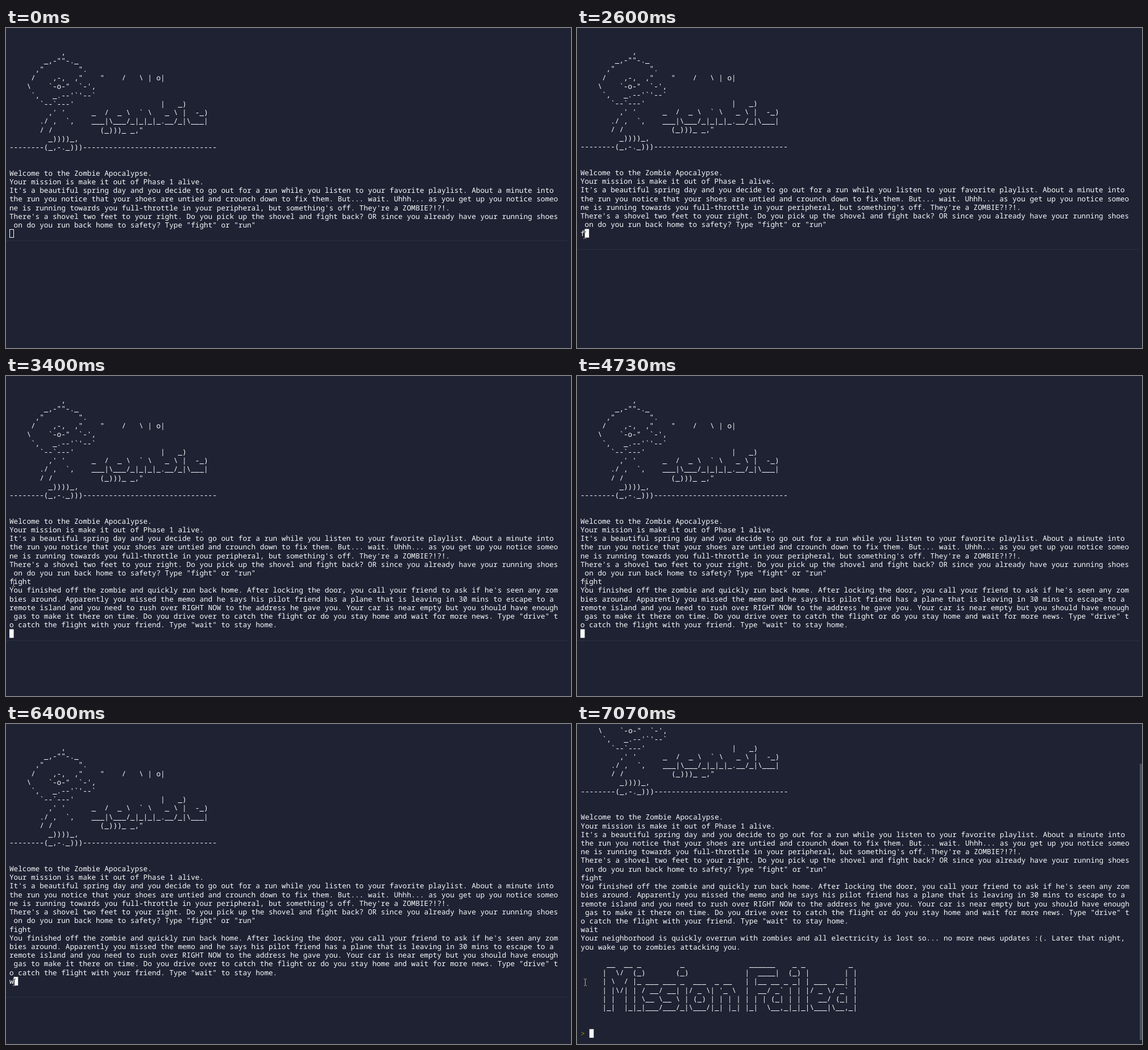
An HTML page with a canvas that plays this animation: 994 px wide and 563 px high, repeating every 8 s.

```html
<!DOCTYPE html>
<html lang="en">
<head>
<meta charset="utf-8">
<title>Zombie terminal</title>
<style>
  html, body { margin: 0; width: 100%; height: 100%; overflow: hidden; background: #1e2233; }
  canvas { display: block; }
</style>
</head>
<body>
<canvas id="stage" width="994" height="563"></canvas>
<script type="text/plain" id="story">


            ,
        _,-""-._
      ,"        ".
     /    ,-,  ,"    "    /   \ | o|
    \    `-o-"  `-',
     `,   _.--'`'--`
       `--`---'                    |   _)
         ,' '      _  /  _ \  ` \   _ \ |  -_)
       ./ ,  `,    ___|\___/_|_|_|_.__/_|\___|
       / /           (_)))_ _,"
         _))))_,
--------(_,-._)))-------------------------------


Welcome to the Zombie Apocalypse.
Your mission is make it out of Phase 1 alive.
It's a beautiful spring day and you decide to go out for a run while you listen to your favorite playlist. About a minute into
the run you notice that your shoes are untied and crounch down to fix them. But... wait. Uhhh... as you get up you notice someo
ne is running towards you full-throttle in your peripheral, but something's off. They're a ZOMBIE?!?!.
There's a shovel two feet to your right. Do you pick up the shovel and fight back? OR since you already have your running shoes
 on do you run back home to safety? Type "fight" or "run"
fight
You finished off the zombie and quickly run back home. After locking the door, you call your friend to ask if he's seen any zom
bies around. Apparently you missed the memo and he says his pilot friend has a plane that is leaving in 30 mins to escape to a
remote island and you need to rush over RIGHT NOW to the address he gave you. Your car is near empty but you should have enough
 gas to make it there on time. Do you drive over to catch the flight or do you stay home and wait for more news. Type "drive" t
o catch the flight with your friend. Type "wait" to stay home.
wait
Your neighborhood is quickly overrun with zombies and all electricity is lost so... no more news updates :(. Later that night,
you wake up to zombies attacking you.

      __  __ _         _               ______    _ _          _
     |  \/  (_)       (_)             |  ____|  (_) |        | |
     | \  / |_ ___ ___ _  ___  _ __   | |__ __ _ _| | ___  __| |
     | |\/| | / __/ __| |/ _ \| '_ \  |  __/ _` | | |/ _ \/ _` |
     | |  | | \__ \__ \ | (_) | | | | | | | (_| | | |  __/ (_| |
     |_|  |_|_|___/___/_|\___/|_| |_| |_|  \__,_|_|_|\___|\__,_|


</script>
<script>
const ctx = document.getElementById('stage').getContext('2d');
const lines = document.getElementById('story').textContent.slice(1).split('\n');

const LOOP = 8000, TICK = 1000 / 15;
const CELL = 7.6, ROW = 15.22, LEFT = 6, TOP = 4.1, BASE = 12;
const BG = '#1e2233', INK = '#fbfcfd', RULE = '#2b3042', THUMB = '#4b5062', PROMPT = '#a39300';
const FIGHT_ROW = 23, WAIT_ROW = 29, PROMPT_ROW = 41;

// [time, letters typed so far]
const fightKeys = [[2600, 1], [2670, 2], [2800, 4], [2930, 5]];
const waitKeys = [[6400, 1], [6530, 2], [6670, 3], [6800, 4]];

const typed = (keys, t) => keys.reduce((n, [at, count]) => t >= at ? count : n, 0);
const mix = (a, b, p) => a + (b - a) * p;
const ease = p => p * p * (3 - 2 * p);

// Progress of a move in whole ticks; the first tick already shows movement.
function progress(t, start, steps) {
  const n = Math.floor((t - start + 4) / TICK) + 1;
  return Math.max(0, Math.min(1, n / steps));
}

function drawText(str, x, y, color = INK) {
  ctx.fillStyle = color;
  for (let i = 0; i < str.length; i++) {
    if (str[i] !== ' ') ctx.fillText(str[i], x + i * CELL, y + BASE);
  }
}

function drawCursor(x, y, filled) {
  if (filled) {
    ctx.fillStyle = INK;
    ctx.fillRect(x, y, CELL, ROW);
  } else {
    ctx.strokeStyle = INK;
    ctx.lineWidth = 1;
    ctx.strokeRect(Math.round(x) + 0.5, Math.round(y) + 0.5, 7, 14);
  }
}

function drawRule(y) {
  ctx.fillStyle = RULE;
  ctx.fillRect(0, y, 988, 1);
}

function drawArrow(x, y) {
  const shape = [[0, 0], [0, 12], [2.8, 9.6], [4.8, 14], [6.8, 13.2], [4.9, 8.8], [8.8, 8.6]];
  ctx.beginPath();
  for (const [dx, dy] of shape) ctx.lineTo(x + 0.6 + dx, y + 0.7 + dy);
  ctx.closePath();
  ctx.fillStyle = '#000';
  ctx.fill();
  ctx.strokeStyle = '#fff';
  ctx.lineWidth = 1;
  ctx.stroke();
}

// Inverts whatever lies beneath it.
function drawBeam(x, y) {
  ctx.save();
  ctx.globalCompositeOperation = 'difference';
  ctx.strokeStyle = '#d8d8d8';
  ctx.lineWidth = 1;
  ctx.beginPath();
  for (const s of [-1, 1]) {
    ctx.moveTo(x - 2.5, y + 6 * s);
    ctx.quadraticCurveTo(x, y + 6 * s, x, y + 4.5 * s);
    ctx.quadraticCurveTo(x, y + 6 * s, x + 2.5, y + 6 * s);
  }
  ctx.moveTo(x, y - 4.5);
  ctx.lineTo(x, y + 4.5);
  ctx.stroke();
  ctx.restore();
}

function drawPointer(t) {
  if (t < 70) return;
  if (t < 130) return drawArrow(599, 428);
  if (t < 4700) {
    const p = ease(progress(t, 470, 12));
    const x = mix(340, 13.5, p), y = mix(409, 364.5, p);
    return y > 374 ? drawArrow(x, y) : drawBeam(x, y);
  }
  const p = progress(t, 4730, 10);
  drawBeam(mix(13.5, 14.5, p) + 2.5 * Math.sin(p * Math.PI * 2), mix(364.5, 454.5, ease(p)));
}

function draw(t) {
  const ended = t >= 7070;
  const typing = (t >= 2600 && t < 3400) || (t >= 6400 && !ended);
  const row = ended ? PROMPT_ROW : t >= 3400 ? WAIT_ROW : FIGHT_ROW;
  const x = LEFT + (ended ? 0.6 : 0);
  const top = TOP - (ended ? 6 * ROW : typing ? 0.6 : 0);
  const rowY = i => top + i * ROW;

  ctx.fillStyle = BG;
  ctx.fillRect(0, 0, 994, 563);
  ctx.font = '500 12.667px "Noto Sans Mono", "DejaVu Sans Mono", monospace';
  ctx.textBaseline = 'alphabetic';
  ctx.textRendering = 'geometricPrecision';

  for (let i = ended ? 6 : 0; i < row; i++) drawText(lines[i] || '', x, rowY(i));

  let col = 2;
  if (ended) {
    drawText('>', x, rowY(row), PROMPT);
    ctx.fillStyle = THUMB;
    ctx.fillRect(990, 70, 4, 486);
  } else {
    col = typed(row === FIGHT_ROW ? fightKeys : waitKeys, t);
    drawText(lines[row].slice(0, col), x, rowY(row));
    drawRule((row === FIGHT_ROW ? 374 : 465) + (typing ? 15 : 0));
  }
  drawCursor(x + col * CELL, rowY(row), t >= 1400);
  drawPointer(t);
}

const began = performance.now();
function loop() {
  draw((performance.now() - began) % LOOP);
  requestAnimationFrame(loop);
}
loop();
</script>
</body>
</html>
```
